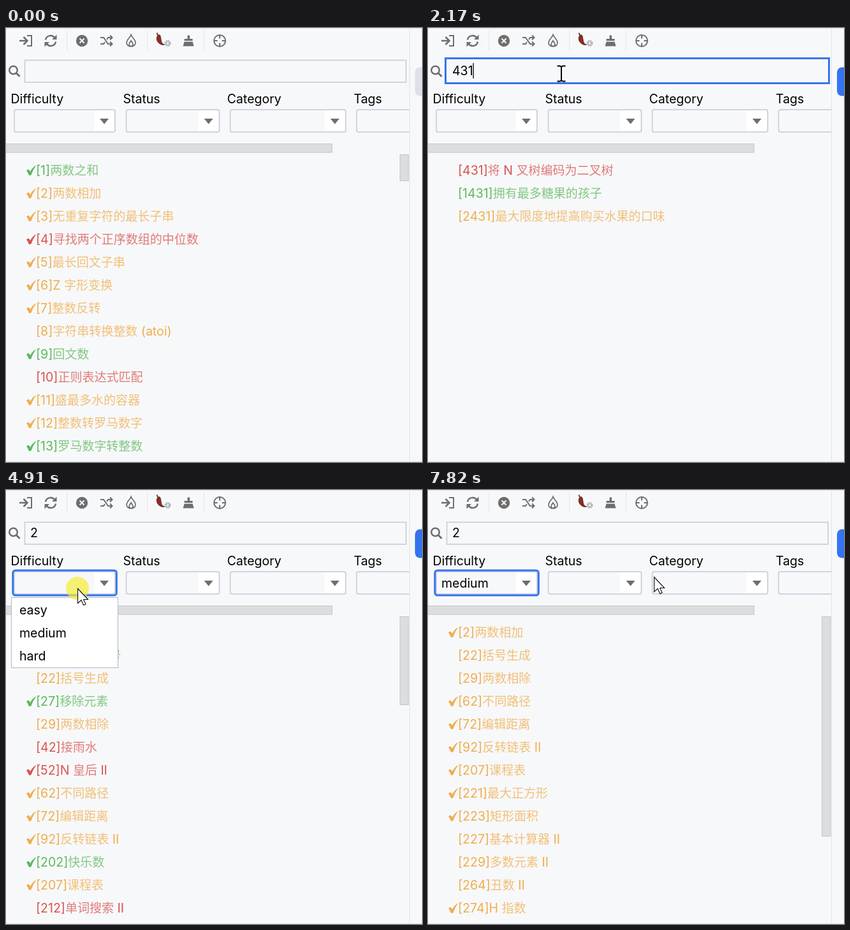
These frames come from a looping animation (652x680 px, 8 s). An HTML page:

```html
<!DOCTYPE html>
<html lang="zh">
<head>
<meta charset="utf-8">
<title>Problem list filter</title>
<style>
html, body { margin: 0; width: 100%; height: 100%; overflow: hidden; background: #f7f8fa; }
svg { display: block; width: 652px; height: 680px; }
text { font: 19.5px Inter, sans-serif; white-space: pre; }
.cjk { font: 300 19px "Noto Sans CJK SC", "Noto Sans CJK", sans-serif; fill-opacity: .76; }
.line { fill: none; stroke: #6e6e6e; stroke-width: 2; }
.bold { stroke-width: 2.5; }
.solid { fill: #6e6e6e; }
.box { fill: none; stroke: #c6c9d6; stroke-width: 1.5; }
.focus { fill: none; stroke: #3574f0; stroke-width: 3; }
.thumb { fill: #dcdddf; stroke: #c4c5c8; }
</style>
</head>
<body>
<svg viewBox="0 0 652 680">
  <path d="M0 .5H652M0 679.5H652M632.5 0V680" stroke="#e1e4ea"/>
  <path d="M95.5 4V35M221.5 4V35M310.5 4V35" stroke="#e3e5ea"/>

  <!-- toolbar -->
  <path class="line bold" d="M21 20H33M27.5 14L33.5 20L27.5 26"/>
  <path class="line" d="M33 12H40V28H33"/>
  <path class="line bold" d="M62 18.5A8 8 0 0 1 76.5 15.5M78 21.5A8 8 0 0 1 63.5 24.5"/>
  <path class="solid" d="M79.5 10.5V18H72ZM60.5 29.5V22H68Z"/>
  <circle class="solid" cx="119" cy="20" r="9.2"/>
  <path d="M115.5 16.5L122.5 23.5M122.5 16.5L115.5 23.5" stroke="#f7f8fa" stroke-width="2"/>
  <path class="line" d="M148 15H153L160 25H166M148 25H153L155 22M158 18L160 15H166M163 11.5L166.5 15L163 18.5M163 21.5L166.5 25L163 28.5"/>
  <path class="line" style="stroke-width:1.7" d="M196 10.5C194 16 189 18 189 23A7 6 0 0 0 203 23C203 18 198 16 196 10.5ZM196 20C195 22 193 23 193 25.5A3 3 0 0 0 199 25.5C199 23 197 22 196 20Z"/>
  <path d="M239 11C235 13 235 20 240 24C243 26.5 246 27 248.5 26C243 24.5 243.5 20 242.5 15C242 11.500 241 10 239 11Z" fill="#8e2b1d" stroke="#4a211a" stroke-width=".8"/>
  <path d="M239 12Q236 9.500 237 7.500" fill="none" stroke="#3d211b" stroke-width="1.500"/>
  <circle cx="253.5" cy="24" r="4" fill="none" stroke="#9a9ca3" stroke-width="1.7" stroke-dasharray="2.2 .94"/>
  <circle cx="253.5" cy="24" r="2.2" fill="none" stroke="#9a9ca3"/>
  <path class="solid" d="M284.5 11.5H288V17H292.5V20H279.5V17H284.5ZM279.5 21.5H292.5L294.5 28.5H277.5Z"/>
  <circle class="line" cx="335" cy="20" r="9"/>
  <path class="line" d="M335 11V16.5M335 23.5V29M326 20H331.5M338.5 20H344"/>

  <!-- search row and filters -->
  <circle class="line bold" cx="11.5" cy="66" r="6.3"/>
  <path class="line" style="stroke-width:3" d="M16 70.5L21.5 76"/>
  <rect class="box" id="search" x="29.5" y="50.5" width="597.5" height="34.5"/>
  <rect class="focus" id="searchFocus" x="27.5" y="47.5" width="601" height="39"/>
  <text id="query" x="38" y="74"></text>
  <path id="caret" d="M0 55V79" stroke="#000" stroke-width="1.3"/>
  <g id="filters"></g>
  <rect class="focus" id="comboFocus" x="10.8" y="126" width="162.5" height="39" rx="4"/>
  <text id="choice" x="21" y="153"></text>
  <path id="tab" d="M652 61.5H649A8 8 0 0 0 641 69.5V98.5A8 8 0 0 0 649 106.5H652Z"/>

  <!-- list -->
  <rect class="thumb" x="-.5" y="181.5" width="511.5" height="13.5"/>
  <rect class="thumb" id="thumb" x="617.5" y="198.5" width="13.5"/>
  <g id="list"></g>

  <g id="popup">
    <rect x="8.5" y="168.5" width="167" height="110" fill="#fff" stroke="#b5b8c6"/>
    <rect id="hover" x="9" y="169" width="166" height="36" fill="#cfdefb"/>
    <text x="21" y="195">easy</text>
    <text x="21" y="231">medium</text>
    <text x="21" y="267">hard</text>
  </g>
  <g id="mouse">
    <circle id="press" r="18" fill="#f5ed35" fill-opacity=".7"/>
    <path id="arrow" d="M.5 .5V23.5L6 18.5L9.5 26.5L13 25L9.5 17.5H16.5Z" fill="#fff" stroke="#111" stroke-width="1.1"/>
    <path id="beam" d="M-6.5 -11.5H-2L0 -10L2 -11.5H6.5M0 -10V11M-6.5 12.5H-2L0 11L2 12.5H6.5" fill="none" stroke="#000" stroke-width="2"/>
  </g>
</svg>
<script>
const LOOP = 8000;
const $ = id => document.getElementById(id);
const COLORS = { g: '#5cb85c', o: '#f0ad4e', r: '#d9534f' };
const TICK = '<path d="M32 223.5Q34.5 220.5 36.5 222.5L38 225Q41.5 218 47.5 215Q42 222 39.500 230Q37.500 232 35.500 230Q34.500 226 32 223.500Z"/>';

// Each row: difficulty letter (capital = solved), number, title.
const LISTS = {
  all: [240, 'G1 两数之和|O2 两数相加|O3 无重复字符的最长子串|R4 寻找两个正序数组的中位数|O5 最长回文子串|O6 Z 字形变换|O7 整数反转|o8 字符串转换整数 (atoi)|G9 回文数|r10 正则表达式匹配|O11 盛最多水的容器|O12 整数转罗马数字|G13 罗马数字转整数'],
  4: [337, 'R4 寻找两个正序数组的中位数|G14 最长公共前缀|O24 两两交换链表中的节点|O34 在排序数组中查找元素|O40 组合总和 II|r41 缺失的第一个正数|r42 接雨水|o43 字符串相乘|r44 通配符匹配|O45 跳跃游戏 II|O46 全排列|O47 全排列 II|O48 旋转图像'],
  43: [460, 'o43 字符串相乘|O143 重排链表|g243 最短单词距离|O343 整数拆分|o430 扁平化多级双向链表|r431 将 N 叉树编码为二叉树|r432 全 O(1) 的数据结构|o433 最小基因变化|g434 字符串中的单词数|O435 无重叠区间|o436 寻找右区间|O437 路径总和 III|o438 找到所有字母异位词'],
  431: [0, 'r431 将 N 叉树编码为二叉树|g1431 拥有最多糖果的孩子|o2431 最大限度地提高购买水果的口味'],
  2: [337, 'O2 两数相加|G20 有效的括号|o22 括号生成|G27 移除元素|o29 两数相除|r42 接雨水|R52 N 皇后 II|O62 不同路径|O72 编辑距离|O92 反转链表 II|G202 快乐数|O207 课程表|r212 单词搜索 II'],
  easy: [571, 'G20 有效的括号|G27 移除元素|G202 快乐数|G222 完全二叉树的节点个数|G225 用队列实现栈|G226 翻转二叉树|G228 汇总区间|G231 2 的幂|G232 用栈实现队列|G252 会议室|G263 丑数|G283 移动零|G292 Nim 游戏'],
  medium: [543, 'O2 两数相加|o22 括号生成|o29 两数相除|O62 不同路径|O72 编辑距离|O92 反转链表 II|O207 课程表|O221 最大正方形|O223 矩形面积|o227 基本计算器 II|o229 多数元素 II|o264 丑数 II|O274 H 指数']
};

// Timed values: [start, value], ...
const QUERY = [[0, ''], [1690, '4'], [1820, '43'], [2170, '431'], [2630, '43'], [3160, '4'], [3360, ''], [3760, '2']];
const LIST = [[0, 'all'], [1690, '4'], [1820, '43'], [2170, '431'], [2700, '43'], [3160, '4'], [3360, 'all'], [3760, '2'], [5970, 'easy'], [7140, 'medium']];
const CHOICE = [[0, ''], [5910, 'easy'], [7140, 'medium']];
const HOVER = [[0, -1], [5300, 0], [6870, 1]];

// Time spans in which something shows
const SEARCH = [[960, 4850]];
const CARET = [[960, 1560], [1690, 4300]];
const POPUP = [[4900, 5910], [6530, 7140]];
const PRESS = [[960, 1090], [4780, 5040], [5770, 5910], [6470, 6600], [7080, 7140]];

// Pointer moves: first step, last step, number of steps, x, y
const START = [680, 768];
const MOVES = [
  [70, 430, 6, 190, 20], [490, 560, 2, 200, 33], [760, 890, 3, 211, 71],
  [1690, 1690, 1, 209, 71], [4300, 4640, 6, 112, 154], [5240, 5370, 3, 114, 198],
  [6040, 6400, 6, 97, 152], [6600, 6800, 4, 96, 210], [6870, 6870, 1, 94, 220],
  [7350, 7820, 8, 354, 136]
];

const valueAt = (keys, t) => keys.filter(k => k[0] <= t).pop()[1];
const within = (spans, t) => spans.some(([a, b]) => t >= a && t < b);
const show = (id, on) => $(id).setAttribute('visibility', on ? 'visible' : 'hidden');

function pointerAt(t) {
  let [x, y] = START;
  for (const [a, b, n, toX, toY] of MOVES) {
    if (t < a) break;
    const step = Math.min(n, Math.floor((t - a) * (n - 1) / (b - a || 1)) + 1);
    x += (toX - x) * step / n;
    y += (toY - y) * step / n;
  }
  return [x, y];
}

function rowSvg(row, i) {
  const [, kind, num, title] = row.match(/^(\w)(\d+) (.*)$/);
  const color = COLORS[kind.toLowerCase()];
  const label = title.replace(/[\u4e00-\u9fff]+/g, '<tspan class="cjk">$&</tspan>');
  const tick = kind < 'a' ? TICK : '';
  return `<g fill="${color}" transform="translate(0 ${i * 36})">${tick}<text x="47" y="230">[${num}]${label}</text></g>`;
}

function filterSvg([name, labelX, left, right]) {
  return `<text x="${labelX}" y="118">${name}</text>
    <path d="M${right - 33} 129H${right - 2}V162H${right - 33}Z" fill="#fff"/>
    <rect class="box" x="${left}" y="128" width="${right - left}" height="35" rx="3"/>
    <path class="solid" d="M${right - 24} 142H${right - 10}L${right - 17} 150.5Z"/>`;
}

$('filters').innerHTML = [
  ['Difficulty', 7.5, 13, 171], ['Status', 183.5, 188.5, 334.5], ['Category', 346.5, 351.5, 532.5]
].map(filterSvg).join('') +
  '<text x="545" y="118">Tags</text><path class="box" d="M632 128H552.5Q549.5 128 549.5 131V160Q549.5 163 552.5 163H632"/>';

let shown;
function showList(name) {
  if (name === shown) return;
  shown = name;
  const [end, rows] = LISTS[name];
  $('list').innerHTML = rows.split('|').map(rowSvg).join('');
  $('thumb').setAttribute('height', Math.max(0, end - 199));
  show('thumb', end);
}

function draw(now) {
  const t = now % LOOP;
  const typing = within(SEARCH, t);
  const hover = valueAt(HOVER, t);
  const open = within(POPUP, t);
  const [x, y] = pointerAt(t);
  const inField = y > 50 && y < 86;

  showList(valueAt(LIST, t));
  $('query').textContent = valueAt(QUERY, t);
  $('choice').textContent = valueAt(CHOICE, t);
  $('caret').setAttribute('transform', `translate(${38.5 + $('query').getComputedTextLength()} 0)`);
  $('tab').setAttribute('fill', t < 960 ? '#dfe1e8' : '#3574f0');
  $('hover').setAttribute('y', 169 + 36 * Math.max(0, hover));
  $('mouse').setAttribute('transform', `translate(${x} ${y})`);

  show('search', !typing);
  show('searchFocus', typing);
  show('caret', within(CARET, t));
  show('comboFocus', t >= 4850);
  show('popup', open);
  show('hover', open && hover >= 0);
  show('press', within(PRESS, t));
  show('arrow', t >= 70 && !inField);
  show('beam', t >= 70 && inField);
}

// Inherited visibility keeps hidden popups closed.
const began = performance.now();
function tick() {
  draw(performance.now() - began);
  requestAnimationFrame(tick);
}
tick();
</script>
</body>
</html>
```
